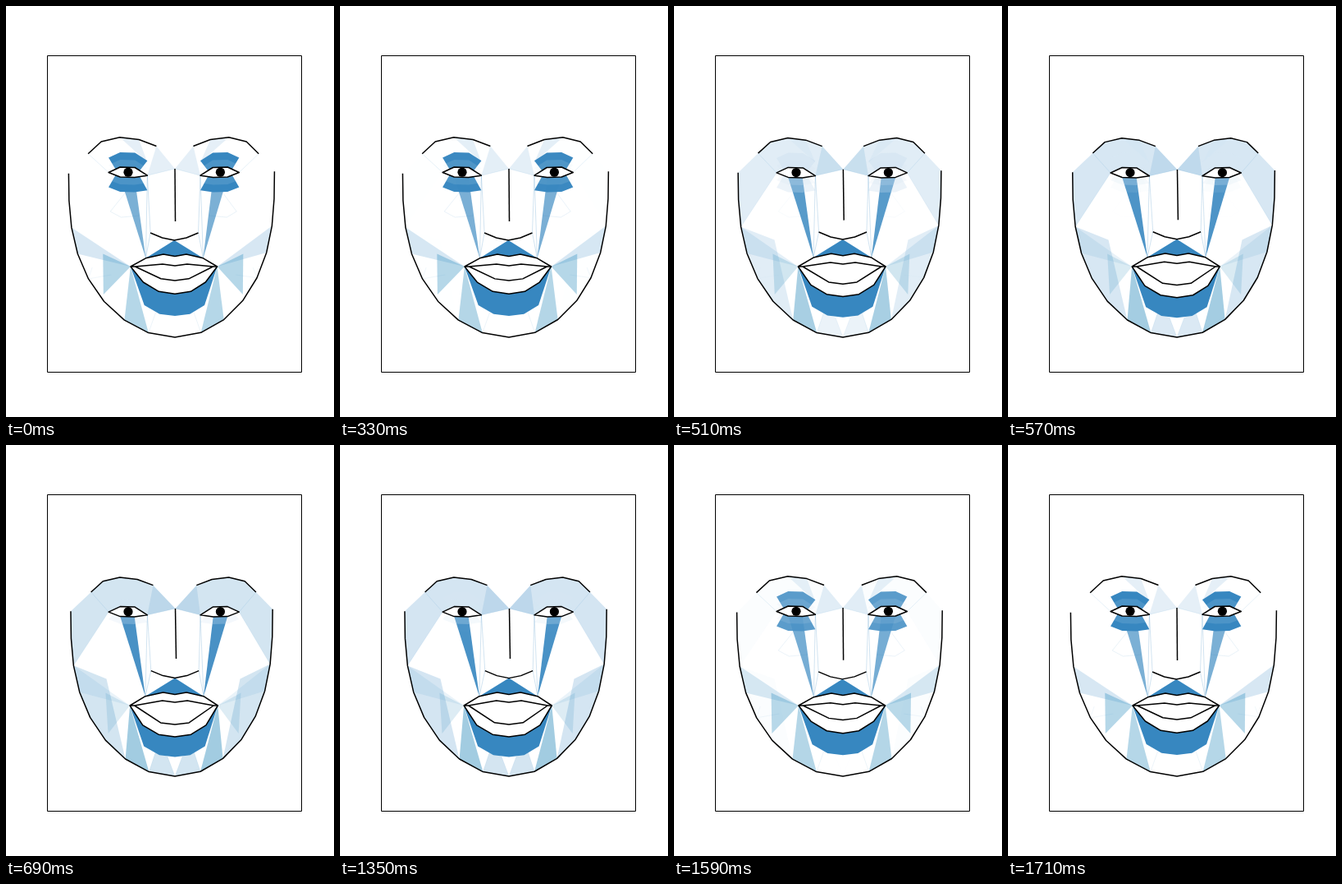
Write an HTML page with a canvas that moves like this. It is 400 px wide and 500 px high and loops after 2.04 s.

```html
<!DOCTYPE html>
<html lang="en">
<head>
<meta charset="utf-8">
<title>Face paint</title>
<style>
html, body { margin: 0; width: 100%; height: 100%; overflow: hidden; background: #fff; }
canvas { display: block; }
</style>
</head>
<body>
<canvas id="stage" width="400" height="500"></canvas>
<script>
const ctx = document.getElementById('stage').getContext('2d');
const LOOP = 2040, STEP = 60, STEPS = 7, LIP_Y = 317;
const BLUE = [55, 135, 192], TEAL = [45, 140, 188], PALE = [211, 228, 241], WHITE = [255, 255, 255];

// Key points of half a face at rest: distance from the middle line, height.
const BROW = [[104, 179.7], [88.5, 165], [66.5, 159.7], [43.5, 162.5], [22.5, 170.5]];
const EYE = [[79.6, 202.5], [65.5, 196], [47.5, 196.5], [32.3, 206.2], [48, 208.5], [65.5, 208]];
const NOSE = [[29.2, 276], [14.7, 282], [0, 285]];
const LIP_TOP = [[52.8, LIP_Y], [35, 306.8], [14, 302], [0, 304.5]];
const LIP_LOW = [[38, 336], [19.5, 347.3], [0, 350.2]];
const MOUTH_TOP = [[47.5, LIP_Y], [15, 314], [0, 316]];
const MOUTH_LOW = [[17, 331.8], [0, 334]];
const BEARD = [[36.7, 364], [18.5, 374.7], [0, 377]];

const lerp = (a, b, p) => a + (b - a) * p;
const ease = u => u < 0.5 ? 4 * u ** 3 : 1 - 4 * (1 - u) ** 3;
const shift = (points, dy) => points.map(([x, y]) => [x, y + dy]);
const mix = (a, b, p) => a.map((v, i) => lerp(v, b[i], p));
const rgba = (c, a) => `rgba(${c.map(Math.round)},${a})`;

function trace(points) {
  ctx.beginPath();
  points.forEach(([x, y]) => ctx.lineTo(x, y));
}

function fill(points, alpha, color = BLUE) {
  trace(points);
  ctx.closePath();
  ctx.fillStyle = rgba(color, alpha);
  ctx.fill();
}

function line(points, width = 1.5, color = '#000') {
  trace(points);
  ctx.lineWidth = width;
  ctx.strokeStyle = color;
  ctx.stroke();
}

// The head is slightly turned, so the middle line bends away with distance.
const place = (side, dx, y, bend = 0, cx = 206) => [cx - bend * dx * dx + side * dx, y];

function jawLine(side, p) {
  const top = 202.5 - 1.5 * p, width = 125.5 - 2.4 * p;
  return Array.from({ length: 9 }, (_, i) => {
    const u = i / 8;
    const dx = width * (1 - 1.9 * u ** 3 + 0.9 * u ** 4);
    const y = lerp(top, 403, 1.32 * u - 0.32 * u ** 4.2) - side * 1.2 * (1 - u);
    return place(side, dx, y, 0.00026);
  });
}

// One side of the face; p goes from rest (0) to fully painted (1).
function half(side, p) {
  const put = (points, bend, cx) => points.map(([dx, y]) => place(side, dx, y, bend, cx));
  const open = (points, up, down) => put(points.map(([dx, y]) =>
    [dx * (1 + 0.015 * p), y + p * (y > LIP_Y ? down : y < LIP_Y ? up : 0)]), 0.00045);
  const gather = BROW.map(([dx, y]) => [lerp(dx, 66, 0.09 * p), lerp(y, 172, 0.1 * p)]);
  return {
    at: (dx, y) => place(side, dx, y, 0.0003),
    jaw: jawLine(side, p),
    brow: put(gather, 0.00017),
    eye: shift(put(EYE, 0, 204.7), 0.6 * p),
    pupil: place(side, 56.2, 202.2 + 0.5 * p, 0, 205.2),
    nose: shift(put(NOSE, 0, lerp(205.3, 206, p)), -1.4 * p),
    lipTop: open(LIP_TOP, -1.1, 0),
    lipLow: open(LIP_LOW, 0, 4.9),
    mouthTop: open(MOUTH_TOP, -3, 0),
    mouthLow: open(MOUTH_LOW, 0, 6.1),
    beard: open(BEARD, 0, 2.5)
  };
}

function lids(eye, d, alpha, color) {
  const [a, b, c, e, f, g] = eye;
  fill([...shift([a, b, c, e], -d), f, g], alpha, color);
  fill([...shift([a, g, f, e], d), c, b], alpha, color);
}

function paintHalf({ at, jaw, brow, eye, nose, lipTop }, top, p) {
  const [corner, peak] = lipTop, inner = eye[3], q = 1 - p;

  // Forehead
  fill([jaw[0], ...brow, top, inner, eye[2], eye[1], eye[0], jaw[2], jaw[1]], 0.22 * p);
  line([brow[0], eye[0]], 0.8, rgba(BLUE, 0.15));
  line([eye[0], jaw[2]], 0.8, rgba(BLUE, 0.12 * p));

  // Cheeks
  fill([...jaw.slice(2, 7), at(81.5, 284.5)], 0.22 * p);
  fill([jaw[2], jaw[3], corner], lerp(0.2, 0.1, p));
  fill([at(lerp(85.5, 82.5, p), 301.5), at(lerp(85, 79.5, p), 351), corner], lerp(0.35, 0.16, p), TEAL);
  fill([jaw[6], jaw[7], corner], lerp(0.35, 0.44, p), TEAL);
  line([at(98, 318), jaw[4], at(76, 327)], 0.6, rgba(BLUE, 0.12 * q));

  // Chin
  const chin = [jaw[7], at(23.3, 373), at(9, 379), jaw[8]];
  fill(chin, 0.22 * p * p);
  line(chin.slice(0, 2), 0.6, rgba(BLUE, 0.16));
  line(chin.slice(2), 0.6, rgba(BLUE, 0.16 * p));

  // Tear and eyelids
  line([at(60, 228), at(77, 250), at(64.5, 257), at(42, 255)], 0.7, rgba(BLUE, 0.16 * q));
  fill([eye[5], eye[4], peak], lerp(0.66, 0.91, p));
  lids(eye, 18, q, mix(BLUE, PALE, Math.min(1, p * 1.3)));
  lids(eye, 9, lerp(0.13, 0.25, p), PALE);

  // Brow fans
  fill([brow[4], top, inner], lerp(0.13, 0.15, p));
  fill([brow[2], brow[3], shift([inner], -16)[0]], 0.13 * q);
  line([inner, top], 0.7, rgba(BLUE, 0.15));
  line([inner, nose[0], peak, inner], 0.9, rgba(BLUE, 0.25));
}

function drawEye({ eye, pupil }) {
  fill(eye, 1, WHITE);
  line([...eye, eye[0], eye[1]]);
  ctx.beginPath();
  ctx.arc(...pupil, 5.6, 0, 2 * Math.PI);
  ctx.fillStyle = '#000';
  ctx.fill();
}

function draw(p) {
  const sides = [half(-1, p), half(1, p)];
  const [left, right] = sides;
  const across = name => [...left[name], ...[...right[name]].reverse()];
  const ring = (top, low) => {
    const points = [...across(top), ...across(low).reverse()];
    return [...points, points[0]];
  };
  const bridge = [[206 + 0.5 * p, 198 + p], [206.5 + p, 262 - 2 * p]];
  const lips = ring('lipTop', 'lipLow');

  ctx.fillStyle = '#fff';
  ctx.fillRect(0, 0, 400, 500);
  ctx.lineJoin = 'round';

  sides.forEach(side => paintHalf(side, bridge[0], p));
  fill([left.lipTop[1], left.nose[2], right.lipTop[1], left.lipTop[3]], 1);
  fill([left.lipTop[0], ...across('beard'), right.lipTop[0]], 1);

  fill(lips, 1, WHITE);
  line([...lips, ...ring('mouthTop', 'mouthLow')]);
  line([right.lipTop[0], right.mouthTop[0]]);
  [across('jaw'), left.brow, right.brow, bridge, across('nose')].forEach(points => line(points));
  sides.forEach(drawEye);

  ctx.lineWidth = 1;
  ctx.strokeStyle = '#000';
  ctx.strokeRect(50.5, 60.5, 310, 385);
}

// The pose advances in discrete steps, there and back.
function poseAt(t) {
  const steps = start => Math.max(0, Math.min(STEPS, Math.floor((t - start) / STEP) + 1));
  return ease((steps(330) - steps(1350)) / STEPS);
}

const origin = performance.now();
function tick() {
  draw(poseAt((performance.now() - origin) % LOOP));
  requestAnimationFrame(tick);
}
tick();
</script>
</body>
</html>
```
